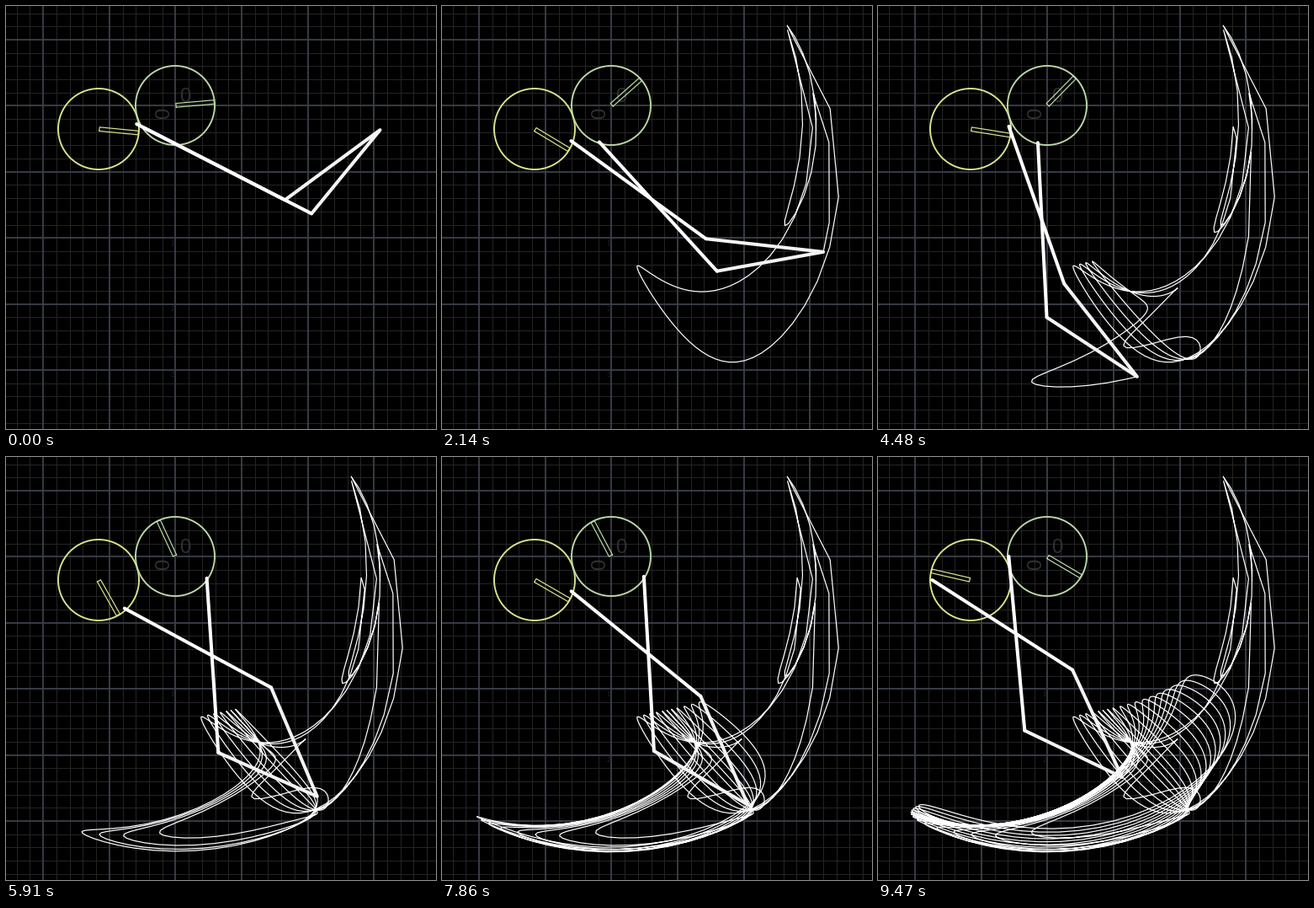
These frames come from a looping animation (511 px wide and 502 px high, 9.6 s). A matplotlib script:

```python
import numpy as np
import matplotlib.pyplot as plt
from matplotlib.animation import FuncAnimation

W, H, DPI = 511, 502, 64
PX = 72 / DPI                       # one pixel in points
LOOP, INTERVAL = 9600, 30
START, STEP, LAST = 330, 67.7, 136  # hold time, step length (ms), final step

# Two wheels rolling on each other carry the pins of a scissor linkage
WHEEL_A, WHEEL_B = np.array([110, 146]), np.array([201, 118])
RADIUS_A, RADIUS_B, CRANK = 48, 47, 45.6
A_PIVOT, A_BAR, A_TIP = 118, 198, 140.3
B_PIVOT, B_BAR, B_TIP = 92, 207.5, 128.4

# Turn of wheel A over the steps, and the sum of both angles over that turn
STEPS = [0, 28, 49, 62, 83, 112, 120, 136]
TURNS = [-7.5, 378, 1048.5, 1436, 2567.5, 3977, 4672.5, 6300]
SUM_TURNS = [-7.5, 378, 1048.5, 1436, 2567.5, 3977, 6300]
SUMS = [137, 126, 110, 100, 82, 48.5, 0]


def polar(degrees):
    a = np.radians(degrees)
    return np.array([np.cos(a), np.sin(a)])


def unit(v):
    return v / np.hypot(*v)


def meet(p, q, rp, rq, side):
    """Point at distance rp from p and rq from q, straight ahead if out of reach."""
    d = np.hypot(*(q - p))
    u = (q - p) / d
    cos = np.clip((rp**2 - rq**2 + d**2) / (2 * d * rp), -1, 1)
    normal = np.array([-u[1], u[0]]) * side
    return p + rp * (cos * u + np.sqrt(1 - cos**2) * normal)


def linkage(turn):
    beta = np.interp(turn, SUM_TURNS, SUMS) - turn
    a = WHEEL_A + CRANK * polar(turn)
    b = WHEEL_B + CRANK * polar(beta)
    pivot = meet(a, b, A_PIVOT, B_PIVOT, 1)
    elbow_a = a + A_BAR * unit(pivot - a)
    elbow_b = pivot + (B_BAR - B_PIVOT) * unit(pivot - b)
    tip = meet(elbow_a, elbow_b, A_TIP, B_TIP, -1)
    return beta, a, b, elbow_a, elbow_b, tip


trail_turns = np.arange(TURNS[0], TURNS[-1], 4.5)
trail_points = np.array([linkage(t)[-1] for t in trail_turns])

fig = plt.figure(figsize=(W / DPI, H / DPI), dpi=DPI, facecolor="black")
ax = fig.add_axes([0, 0, 1, 1])
ax.set_xlim(0, W)
ax.set_ylim(H, 0)
ax.axis("off")

for k in range(-3, 31):
    major = k % 5 == 0
    style = dict(color="#3c404a" if major else "#242424",
                 lw=(1.8 if major else 1) * PX, zorder=1 if major else 0)
    ax.axvline(44.2 + 15.72 * k, **style)
    ax.axhline(40 + 15.68 * k, **style)


def label(x, y, text, size, color, rotation=0):
    ax.text(x, y, text, fontsize=size * PX, color=color, rotation=rotation,
            ha="center", va="center_baseline", family="Liberation Sans", zorder=2)


label(212.5, 105, "0", 24, "#303034")
label(188, 129, "0", 24, "#303034", 90)
for i, y in enumerate((280, 358, 437)):
    label(198, y, str(i + 1), 9, "#1c1f24")


def line(color, width, zorder):
    return ax.plot([], [], color=color, lw=width * PX, zorder=zorder,
                   solid_capstyle="round", solid_joinstyle="round")[0]


def wheel(center, radius, color):
    ax.add_patch(plt.Circle(center, radius, fill=False, ec=color, lw=1.9 * PX, zorder=3))
    return line(color, 1.2, 3)


def set_points(artist, *points):
    artist.set_data(*np.array(points).T)


def set_hand(artist, center, radius, angle):
    u = polar(angle)
    n = 2.3 * np.array([-u[1], u[0]])
    near, far = center + u, center + (radius - 0.5) * u
    set_points(artist, near + n, far + n, far - n, near - n, near + n)


hand_a = wheel(WHEEL_A, RADIUS_A, "#dbe48c")
hand_b = wheel(WHEEL_B, RADIUS_B, "#bcd9a8")
trail = line("white", 1.2, 4)
trail.set_solid_joinstyle("miter")
tip_bars = line("#f4f4f4", 4, 5)
bar_a, bar_b = line("white", 4, 6), line("white", 4, 6)


def draw(i):
    t = i * INTERVAL
    step = 0 if t < START else min(LAST, 1 + round((t - START) / STEP))
    turn = np.interp(step, STEPS, TURNS)
    beta, a, b, elbow_a, elbow_b, tip = linkage(turn)
    set_hand(hand_a, WHEEL_A, RADIUS_A, turn + 13)
    set_hand(hand_b, WHEEL_B, RADIUS_B, beta - 149.5)
    set_points(bar_a, a, elbow_a)
    set_points(bar_b, b, elbow_b)
    set_points(tip_bars, elbow_a, tip, elbow_b)
    set_points(trail, *trail_points[trail_turns < turn], tip)
    return hand_a, hand_b, trail, tip_bars, bar_a, bar_b


anim = FuncAnimation(fig, draw, frames=LOOP // INTERVAL, interval=INTERVAL,
                     repeat=True, repeat_delay=0)
plt.show()
```
